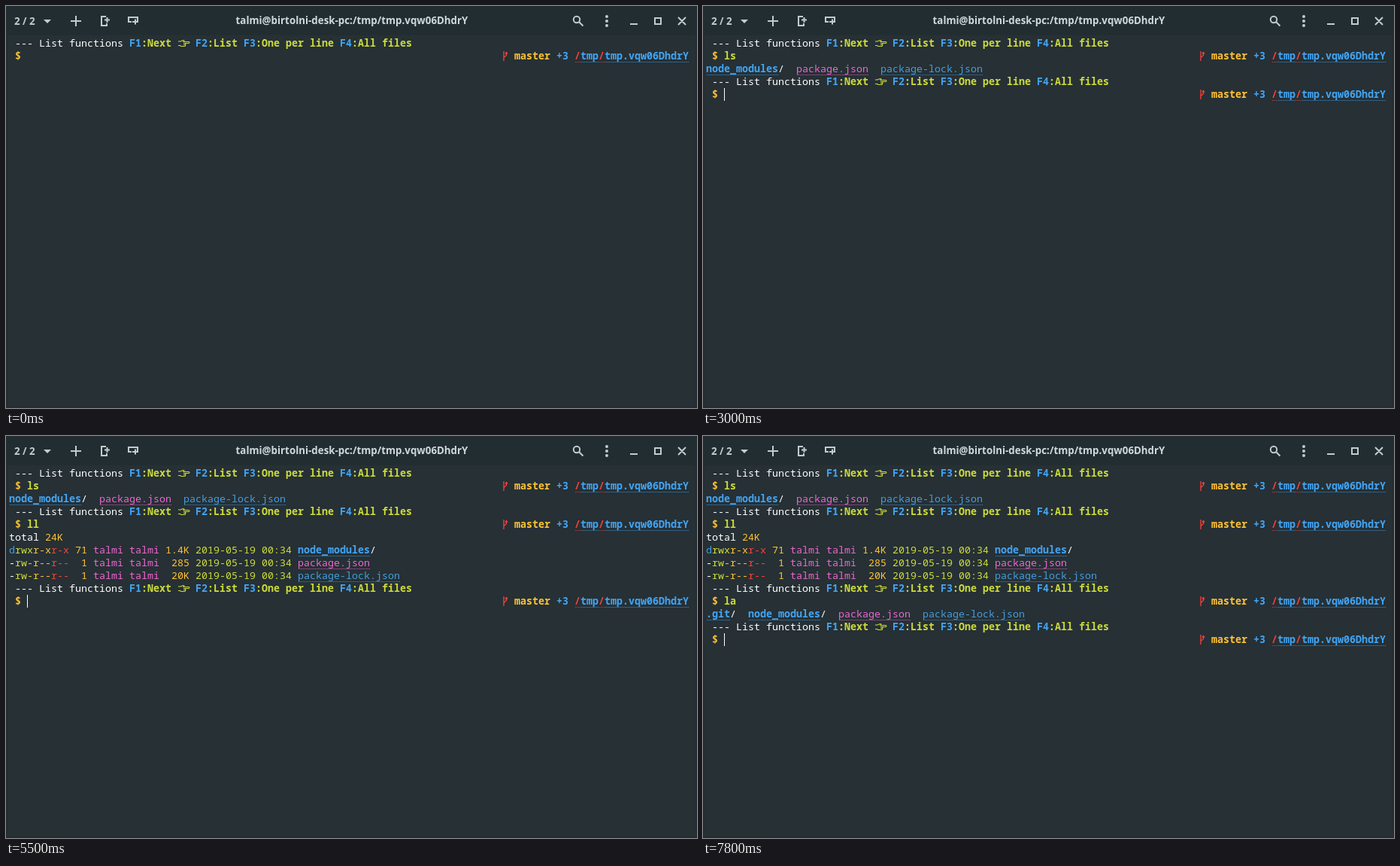
Animation of 919x534 px, one loop 8000 ms. Source, as an HTML page:

```html
<!DOCTYPE html>
<html lang="en">
<head>
<meta charset="utf-8">
<title>Terminal</title>
<style>
  html, body { margin: 0; width: 100%; height: 100%; overflow: hidden; background: #263035; }
  svg { display: block; }
  text { white-space: pre; }
  .term text { font: 500 13.333px "Noto Sans Mono", monospace; }
  .term .b { font-weight: 700; }
  .bar text { font: 700 13.333px "Noto Sans", sans-serif; fill: #cfd8dc; }
  .bar .tabs { fill: #c2cbcf; }
  .dots { stroke-dasharray: 1 1; stroke-dashoffset: 1; stroke-opacity: .8; }
  .icon { fill: none; stroke: #c2cbcf; stroke-width: 2; }
  .solid { fill: #c2cbcf; }
</style>
</head>
<body>
<svg width="919" height="534" viewBox="0 0 919 534">
  <rect width="919" height="534" fill="#222d32"/>
  <rect x="2" y="39" width="915" height="493" fill="#263035"/>
  <g class="bar">
    <text class="tabs" x="11" y="24.5">2 / 2</text>
    <text x="460" y="24" text-anchor="middle">talmi@birtolni-desk-pc:/tmp/tmp.vqw06DhdrY</text>
    <path class="solid" d="M50 18h10l-5 5z"/>
    <path class="icon" d="M86 20h14M93 13v14"/>
    <path class="icon" d="M133 14h-6v12h7v-3M131 18.500h7M134.5 15v7"/>
    <path class="icon" d="M167 21h-4v-6h12v5M168 21h8M172 17.500v7"/>
    <circle class="icon" cx="759" cy="18" r="4.200"/>
    <path class="icon" d="M762 21l5.500 5.500"/>
    <g class="solid">
      <circle cx="799" cy="14" r="2"/>
      <circle cx="799" cy="20" r="2"/>
      <circle cx="799" cy="26" r="2"/>
    </g>
    <path class="icon" d="M830 24h10M863 16h8v8h-8zM894 15l10 10M904 15l-10 10"/>
  </g>
  <g class="term" id="term"></g>
</svg>
<script>
const LOOP = 8000;
const CELL = 8, LINE = 17, LEFT = 4, TOP = 41;
const WHITE = '#ffffff', BLUE = '#42a5f5', LIME = '#cddc39', AMBER = '#ffc233',
      PINK = '#ee66cf', RED = '#f9413c', SKY = '#459ddc';

const term = document.getElementById('term');
const timed = [];

function add(parent, tag, attrs, content = '') {
  const el = document.createElementNS('http://www.w3.org/2000/svg', tag);
  for (const key in attrs) el.setAttribute(key, attrs[key]);
  el.textContent = content;
  return parent.appendChild(el);
}

const xAt = col => LEFT + col * CELL;
const yAt = row => TOP + row * LINE;

// Group that becomes visible at a given time
function block(from) {
  const el = add(term, 'g', {});
  timed.push({ el, from });
  return el;
}

// Style letters: b = bold, u = dotted underline. Returns the next column.
function put(g, row, col, str, fill, style = '') {
  const x = xAt(col), y = yAt(row), end = col + str.length;
  add(g, 'text', { x, y: y + 13, fill, class: style.includes('b') ? 'b' : '' }, str);
  if (style.includes('u')) {
    add(g, 'path', { class: 'dots', stroke: fill, d: `M${x} ${y + 16.5}H${xAt(end)}` });
  }
  return end;
}

function hints(g, row) {
  put(g, row, 1, '--- List functions', WHITE);
  const keys = [[20, 'F1', 'Next'], [31, 'F2', 'List'], [39, 'F3', 'One per line'], [55, 'F4', 'All files']];
  for (const [col, key, label] of keys) {
    put(g, row, col, key, BLUE, 'b');
    put(g, row, col + 2, ':' + label, LIME, 'b');
  }
  add(g, 'path', {
    transform: `translate(${xAt(28)} ${yAt(row) + 3})`, fill: 'none', stroke: LIME, 'stroke-width': 1.1,
    d: 'M1 3H4L7.500 1.500L9 2L8 3.500H15Q17 4.500 15 5.500H10.500Q11.500 6.500 10.500 7.500Q11 9.500 9.500 9.500H5L3.500 8.500H1M8 5.500h2.500M8 7.500h2.500'
  });
}

function prompt(g, row) {
  put(g, row, 1, '$', AMBER, 'b');
  add(g, 'path', {
    transform: `translate(${xAt(82)} ${yAt(row)})`, fill: 'none', stroke: RED, 'stroke-width': 1.3,
    d: 'M2 2v13M2 10.500L5.500 7.500V4M4 5.500L5.500 3.500L7 5.500'
  });
  put(g, row, 84, 'master', AMBER, 'b');
  put(g, row, 91, '+3', BLUE, 'b');
  let col = 94;
  for (const part of ['/', 'tmp', '/', 'tmp.vqw06DhdrY']) {
    col = put(g, row, col, part, part === '/' ? RED : BLUE, 'bu');
  }
}

function folder(g, row, col, name) {
  put(g, row, put(g, row, col, name, BLUE, 'bu'), '/', WHITE);
}
const manifest = (g, row, col) => put(g, row, col, 'package.json', PINK, 'u');
const lock = (g, row, col) => put(g, row, col, 'package-lock.json', SKY, 'u');

function files(g, row, col) {
  folder(g, row, col, 'node_modules');
  manifest(g, row, col + 15);
  lock(g, row, col + 29);
}

function details(g, row, mode, links, size) {
  put(g, row, 0, mode[0], mode[0] === 'd' ? SKY : WHITE);
  [LIME, AMBER, RED].forEach((fill, i) => put(g, row, 1 + i * 3, mode.substr(1 + i * 3, 3), fill));
  put(g, row, 11, links, AMBER);
  put(g, row, 14, 'talmi', PINK);
  put(g, row, 20, 'talmi', PINK);
  put(g, row, 26, size, AMBER);
  put(g, row, 31, '2019-05-19 00:34', LIME);
}

function ready(g, row) {
  hints(g, row);
  prompt(g, row + 1);
}

const command = (from, row, str) => put(block(from), row, 3, str, LIME, 'b');

ready(block(0), 0);

command(1900, 1, 'ls');
const short = block(2000);
files(short, 2, 0);
ready(short, 3);

command(4400, 4, 'll');
const long = block(4500);
put(long, 5, 0, 'total', WHITE);
put(long, 5, 6, '24K', AMBER);
details(long, 6, 'drwxr-xr-x', '71', '1.4K');
folder(long, 6, 48, 'node_modules');
details(long, 7, '-rw-r--r--', ' 1', ' 285');
manifest(long, 7, 48);
details(long, 8, '-rw-r--r--', ' 1', ' 20K');
lock(long, 8, 48);
ready(long, 9);

command(7600, 10, 'la');
const all = block(7700);
folder(all, 11, 0, '.git');
files(all, 11, 7);
ready(block(7800), 12);

// Cursor: time, row, column; no row means hidden
const blinks = [
  [0], [100, 1, 3], [800], [1400, 1, 3], [1900, 2, 0],
  [2000, 4, 3], [2400], [3000, 4, 3], [3600], [4200, 4, 3], [4400, 5, 0],
  [4500, 10, 3], [4900], [5500, 10, 3], [6100], [6700, 10, 3], [7300],
  [7600, 11, 0], [7700, 12, 0], [7800, 13, 3]
];
const cursor = add(term, 'rect', { width: 1, height: LINE, fill: WHITE });

function draw(now) {
  const t = now % LOOP;
  for (const { el, from } of timed) el.style.visibility = t >= from ? 'visible' : 'hidden';
  const [, row, col] = blinks.filter(step => step[0] <= t).pop();
  cursor.style.visibility = row ? 'visible' : 'hidden';
  if (row) {
    cursor.setAttribute('x', xAt(col));
    cursor.setAttribute('y', yAt(row));
  }
}

let start;
function tick(now) {
  start ??= now;
  draw(Math.max(0, now - start));
  requestAnimationFrame(tick);
}
draw(0);
requestAnimationFrame(tick);
</script>
</body>
</html>
```
